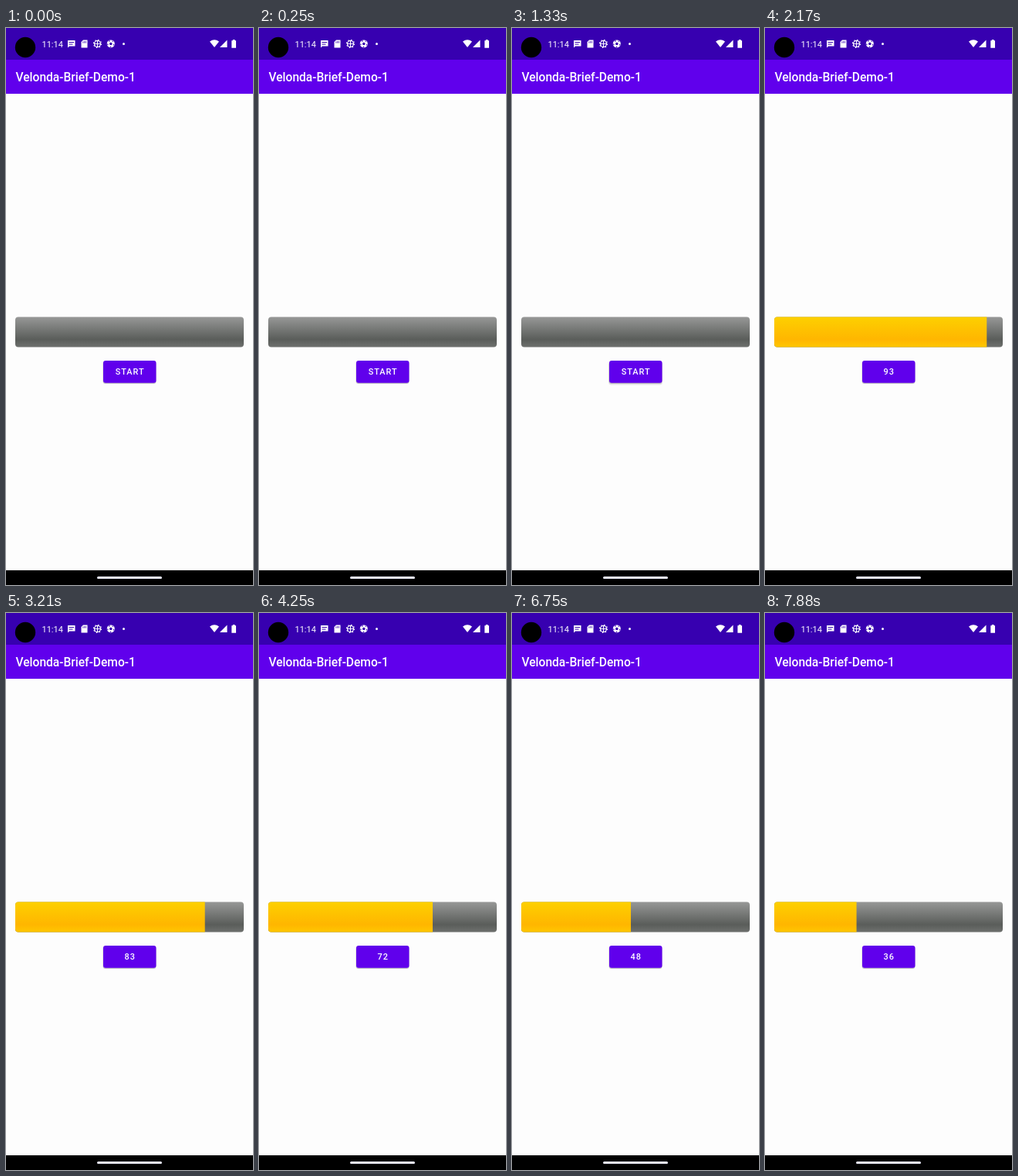
Recreate the animation shown at these times as an HTML page. Size 320 px wide and 720 px high, loop 8 s.

```html
<!DOCTYPE html>
<html lang="en">
<head>
<meta charset="utf-8">
<title>Countdown</title>
<style>
  html, body { margin: 0; width: 100%; height: 100%; overflow: hidden; background: #fdfdfd; }
  svg { display: block; width: 100%; height: 100%; }
  text { font-family: Roboto, sans-serif; fill: #fff; }
  .title { font-size: 15.6px; font-weight: 500; }
  .label { font-size: 10.9px; font-weight: 500; letter-spacing: .97px; text-anchor: middle; }
</style>
</head>
<body>
<svg viewBox="0 0 320 720" preserveAspectRatio="none">
  <defs>
    <linearGradient id="track" x2="0" y2="1">
      <stop stop-color="#979897"/><stop offset=".75" stop-color="#5a5d5a"/><stop offset="1" stop-color="#6e706e"/>
    </linearGradient>
    <linearGradient id="gold" x2="0" y2="1">
      <stop stop-color="#fdd000"/><stop offset=".75" stop-color="#ffb600"/><stop offset="1" stop-color="#ffc600"/>
    </linearGradient>
    <clipPath id="filled"><rect id="fill" x="12" y="373" height="41" width="0"/></clipPath>
  </defs>

  <rect width="320" height="720" fill="#fdfdfd"/>
  <rect width="320" height="41" fill="#3700b0"/>
  <rect y="41" width="320" height="44" fill="#6000ec"/>
  <rect y="701" width="320" height="19"/>
  <rect x="118" y="709" width="84" height="3" rx="1.5" fill="#ececfb"/>

  <g class="soft">
    <circle cx="25" cy="25" r="13.2"/>
    <text x="46.5" y="24.5" font-size="11">11:14</text>
    <g fill="#fff">
      <path d="M80 16h9.5v7.5h-7.5l-2 2z"/>
      <path d="M100 15.5h5.5v10h-8v-7.5z"/>
      <circle cx="152.5" cy="20.5" r="1.5"/>
      <path d="M264 17.5q6-4.500 12 0l-6 7.500z"/>
      <path d="M286.5 15.5v9.500h-9.500z"/>
      <path d="M293.8 15h2.700v1.200h1.500v9.500h-5.700v-9.500h1.500z"/>
      <circle cx="135.8" cy="20.4" r="5"/>
    </g>
    <g fill="none" stroke="#3700b0">
      <path d="M81.5 18.5h6.500M81.5 21h5"/>
      <path d="M99.8 17.5v2M101.6 17v2.500M103.4 17v2.500" stroke-width=".8"/>
      <circle cx="135.8" cy="20.4" r="4" stroke-width="1.2" stroke-dasharray="1.5 3.527" transform="rotate(-65 135.8 20.4)"/>
    </g>
    <path d="M135.8 18.400l1.900 1.400-.7 2.200h-2.400l-.7-2.200z" fill="#3700b0"/>
    <g fill="none" stroke="#fff">
      <circle cx="118.5" cy="20.4" r="4" stroke-width="1.2"/>
      <circle cx="118.5" cy="20.4" r="5" stroke-width="1.2" stroke-dasharray="1.5 2.427"/>
      <path d="M114.5 20.4h8M118.5 16.4v8"/>
    </g>
    <text class="title" x="12.4" y="69">Velonda-Brief-Demo-1</text>
  </g>

  <rect x="12" y="373.5" width="296" height="39" rx="4" fill="url(#track)"/>
  <rect x="12" y="373.5" width="296" height="39" rx="4" fill="url(#gold)" clip-path="url(#filled)"/>

  <rect id="lift" x="125" y="431.5" width="70" height="30" rx="4" fill="#c8c8c8"/>
  <rect x="125.5" y="431" width="69" height="29" rx="3.5" fill="#a6a6a6" opacity=".6"/>
  <rect x="126" y="430" width="68.5" height="28.8" rx="3" fill="#6000ec"/>
  <g class="soft"><text id="label" class="label" x="160.7" y="448.4">START</text></g>
</svg>

<script>
  const LOOP = 8000, PRESS = 1290, COUNT_FROM = 1438, LAST_TICK = 7862, TICK = 100.5, LAST = 36;
  const get = id => document.getElementById(id);
  const label = get('label'), fill = get('fill'), lift = get('lift');
  const soft = document.querySelectorAll('.soft');
  const clamp = (v, lo, hi) => Math.min(hi, Math.max(lo, v));

  function countAt(t) {
    return clamp(LAST + Math.ceil((LAST_TICK - t) / TICK), LAST, 100);
  }

  function draw(t) {
    const counting = t >= COUNT_FROM;
    const count = counting ? countAt(t) : 0;
    label.textContent = counting ? count : 'START';
    fill.setAttribute('width', 2.96 * count);

    // The button rises while pressed, then settles.
    const rise = clamp((t - PRESS) / 60, 0, 1) * clamp((1650 - t) / 150, 0, 1);
    lift.setAttribute('opacity', .6 * rise);

    // The picture opens slightly soft and sharpens.
    const blur = .7 * clamp((340 - t) / 240, 0, 1);
    soft.forEach(g => g.style.filter = blur ? `blur(${blur}px)` : 'none');
  }

  const start = performance.now();
  function tick() {
    draw((performance.now() - start) % LOOP);
    requestAnimationFrame(tick);
  }
  tick();
</script>
</body>
</html>
```
